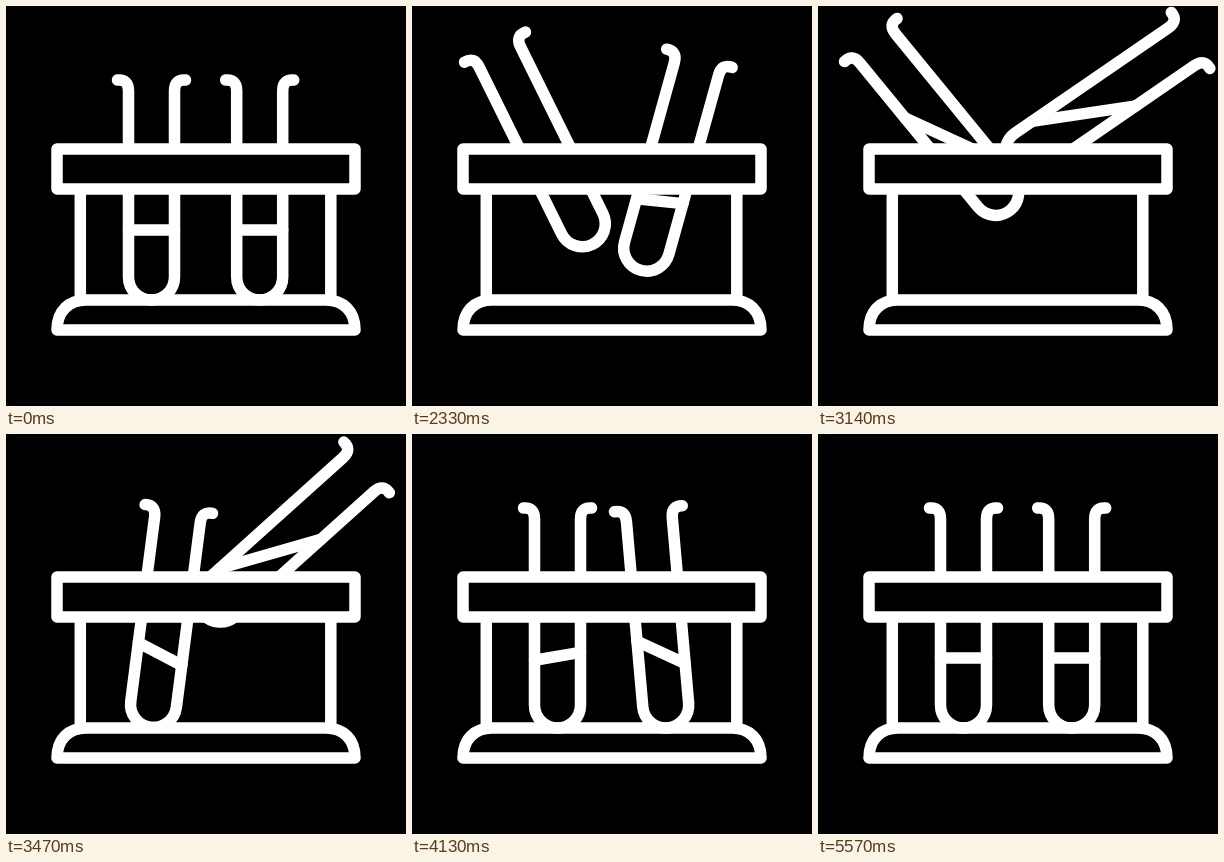
An HTML page for the animation above (5.63 s loop, 400x400 px).

```html
<!DOCTYPE html>
<html lang="en">
<head>
<meta charset="utf-8">
<title>Test tubes</title>
<style>
  html, body { margin: 0; width: 100%; height: 100%; overflow: hidden; background: #000; }
  svg { display: block; width: 100%; height: 100%; }
  svg * { fill: none; stroke: #fff; stroke-width: 11.5; stroke-linecap: round; stroke-linejoin: round; }
  .solid { fill: #000; }
</style>
</head>
<body>
<svg viewBox="0 0 400 400">
  <g id="tubes"></g>
  <path d="M74.3 183V294M324.8 183V294"/>
  <rect class="solid" x="51" y="143" width="298" height="40"/>
  <path d="M51 324C51 305 63 294 80 294H320C337 294 349 305 349 324Z"/>
</svg>
<script>
const LOOP = 5630;
const START = 2000;
const FLOOR = 271;
const R = 23;
const OUTLINE = `M-34 -197Q-${R} -198 -${R} -186V0A${R} ${R} 0 0 0 ${R} 0V-186Q${R} -198 34 -197`;

// x: resting centre; shift, rise, tilt: pose at the top; times in ms
const TUBES = [
  { x: 145.5, shift: 40.5, rise: 127, tilt: -56, liftTime: 690, fallAt: 2935 },
  { x: 253.7, shift: -43.5, rise: 125, tilt: 55.5, liftTime: 950, fallAt: 3340 }
];

const clamp = v => Math.min(1, Math.max(0, v));
const smooth = v => (v = clamp(v), v * v * (3 - 2 * v));

const lift = (tube, t) => smooth((t - START) / tube.liftTime);

// Overshoot after landing: quick out, slow back
function rebound(age) {
  const u = clamp((age - 380) / 820);
  return 8.5 * Math.sin(Math.PI * (1 - u) ** 2.3);
}

// Liquid keeps its lean for a while, then rocks to rest
function slosh(age) {
  const x = Math.max(0, age - 290);
  return Math.cos(2 * Math.PI * x / 1320) * clamp(1 - x / 1950) ** 1.5;
}

function pose(tube, t) {
  const age = t - tube.fallAt;
  const side = Math.sign(tube.tilt);
  const up = lift(tube, t) * (1 - smooth(age / 570));
  const lean = 64 * side * lift(tube, t - 100) * slosh(age);
  return {
    x: tube.x + tube.shift * up ** 0.65,
    y: FLOOR - tube.rise * up ** 1.15,
    tilt: tube.tilt * up - side * rebound(age),
    slope: R * Math.tan(lean * Math.PI / 180)
  };
}

function add(parent, name) {
  return parent.appendChild(document.createElementNS("http://www.w3.org/2000/svg", name));
}

for (const tube of TUBES) {
  tube.group = add(document.getElementById("tubes"), "g");
  add(tube.group, "path").setAttribute("d", OUTLINE);
  tube.liquid = add(tube.group, "path");
}

function draw() {
  const t = performance.now() % LOOP;
  for (const tube of TUBES) {
    const { x, y, tilt, slope } = pose(tube, t);
    const level = 47 + 0.44 * Math.abs(slope);
    tube.group.setAttribute("transform", `translate(${x} ${y}) rotate(${tilt})`);
    tube.liquid.setAttribute("d", `M-${R} ${slope - level}L${R} ${-slope - level}`);
  }
  requestAnimationFrame(draw);
}
draw();
</script>
</body>
</html>
```
